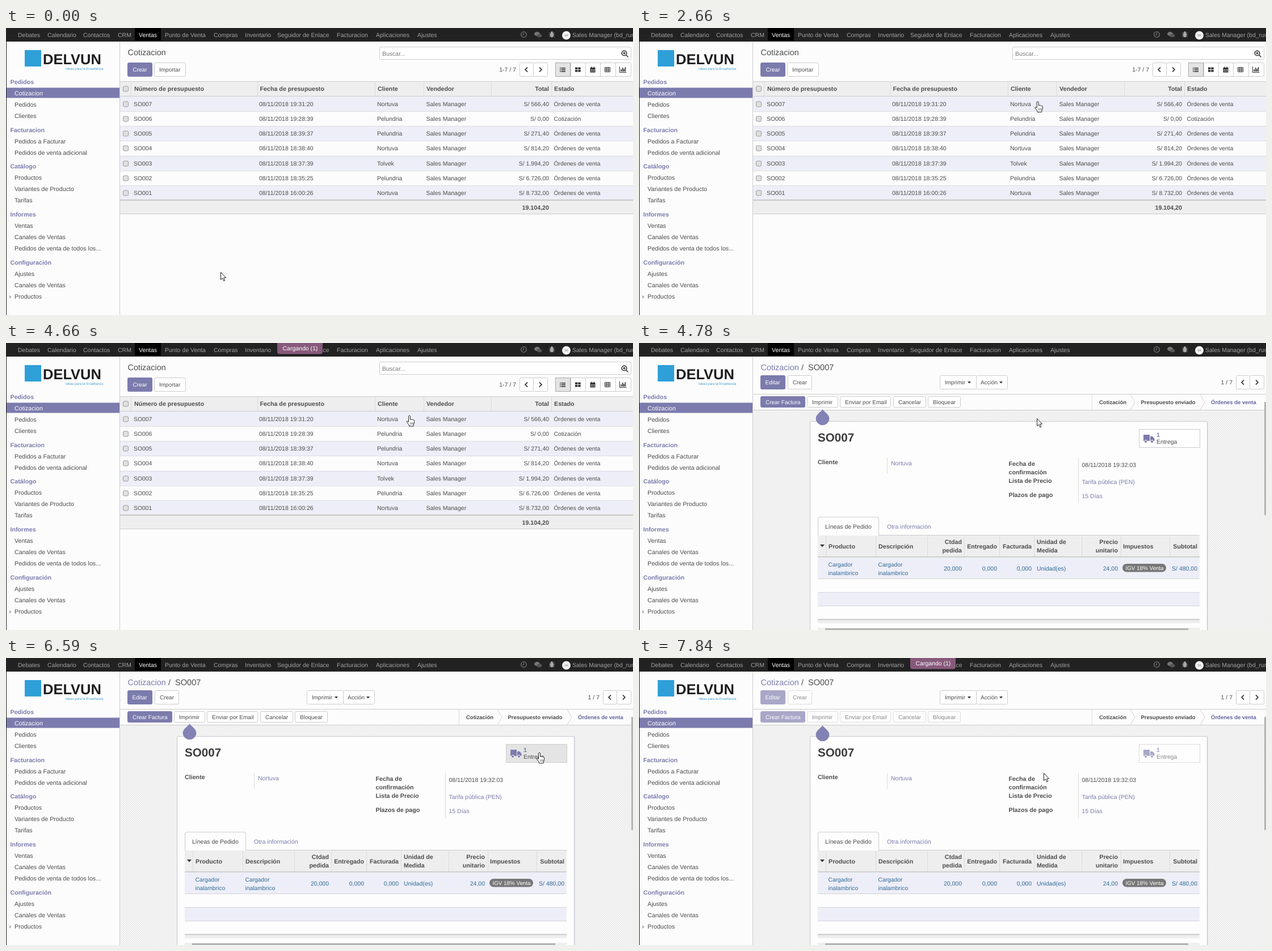
These frames come from a looping animation (1105 by 507 pixels, 7.99 s). An HTML page:

```html
<!DOCTYPE html>
<html lang="es">
<head>
<meta charset="utf-8">
<title>Cotizacion</title>
<style>
html, body { margin: 0; width: 100%; height: 100%; overflow: hidden; background: #fcfcfc; }
svg { display: block; width: 1105px; height: 507px; }
text { font-family: "Liberation Sans", Arial, sans-serif; text-rendering: geometricPrecision; white-space: pre; }
</style>
</head>
<body>
<svg id="stage" viewBox="0 0 1105 507"></svg>
<script>
const INK = '#4c4c4c', PURPLE = '#7c7bad', LINE = '#cccccc', STRIPE = '#eeeef8', LINK = '#2f6b94';
const LOOP = 7990;

// Drawing helpers, each returns SVG markup
const text = (x, y, s, { size = 10.5, fill = INK, bold, end } = {}) =>
  `<text x="${x}" y="${y}" font-size="${size}" fill="${fill}"` +
  `${bold ? ' font-weight="700"' : ''}${end ? ' text-anchor="end"' : ''}>${s}</text>`;
const bold = (x, y, s, o = {}) => text(x, y, s, { size: 10.7, bold: true, ...o });
const rect = (x, y, w, h, fill, extra = '') =>
  `<rect x="${x}" y="${y}" width="${w}" height="${h}" fill="${fill}" ${extra}/>`;
const box = (x, y, w, h, fill = '#fff', stroke = LINE, r = 2) =>
  rect(x + .5, y + .5, w - 1, h - 1, fill, `stroke="${stroke}" rx="${r}"`);
const path = (d, fill = 'none', stroke = 'none', w = 1) =>
  `<path d="${d}" fill="${fill}" stroke="${stroke}" stroke-width="${w}"/>`;
const hline = (x, y, w, c = LINE) => rect(x, y, w, 1, c);
const vline = (x, y, h, c = '#dcdcdc') => rect(x, y, 1, h, c);
const group = (id, body) => `<g id="${id}">${body}</g>`;
const button = (x, y, w, h, label, tx, primary) =>
  box(x, y, w, h, primary ? PURPLE : '#fff', primary ? PURPLE : LINE) +
  text(tx, y + h / 2 + 3.6, label, { size: 10, fill: primary ? '#fff' : INK });
const pager = (x, y) => {
  const arrow = (cx, d) => path(`M${cx - 2 * d} ${y + 8.5}l${4 * d} 4l${-4 * d} 4`, 'none', '#444', 1.8);
  return box(x, y, 25, 25) + box(x + 24, y, 26, 25) + arrow(x + 12, -1) + arrow(x + 37, 1);
};

function topBar() {
  const menu = [[21, 'Debates'], [73, 'Calendario'], [136, 'Contactos'], [197, 'CRM'], [234, 'Ventas'],
    [280, 'Punto de Venta'], [366, 'Compras'], [421, 'Inventario'], [478, 'Seguidor de Enlace'],
    [583, 'Facturacion'], [652, 'Aplicaciones'], [725, 'Ajustes']];
  const grey = '#777';
  return rect(0, 0, 1105, 24, '#222') + rect(227, 0, 46, 22, '#000') +
    menu.map(([x, s]) => text(x, 15.5, s, { fill: s === 'Ventas' ? '#fff' : '#a3a3a3' })).join('') +
    `<circle cx="912.5" cy="11.5" r="4.8" fill="none" stroke="${grey}" stroke-width="1.3"/>` +
    path('M912.5 8.5v3.5h-2.5', 'none', grey) +
    `<ellipse cx="936" cy="10.5" rx="5" ry="3.7" fill="${grey}"/>` +
    `<ellipse cx="940" cy="13.5" rx="4.5" ry="3" fill="#555"/>` +
    path('M957.5 8l9 8M966.5 8l-9 8M957 12h10', 'none', '#aaa') +
    '<ellipse cx="962" cy="12.3" rx="2.9" ry="4.2" fill="#aaa"/><circle cx="962" cy="8" r="2" fill="#aaa"/>' +
    '<circle cx="987.5" cy="13" r="7.5" fill="#f4f4f4"/>' + rect(984, 11, 7, 4, '#ccc', 'rx="1"') +
    text(998, 15.5, 'Sales Manager (bd_ruma', { fill: '#a3a3a3' });
}

function sideBar() {
  const menu = [
    [99, 'Pedidos', 'Cotizacion', 'Pedidos', 'Clientes'],
    [184, 'Facturacion', 'Pedidos a Facturar', 'Pedidos de venta adicional'],
    [248, 'Catálogo', 'Productos', 'Variantes de Producto', 'Tarifas'],
    [333, 'Informes', 'Ventas', 'Canales de Ventas', 'Pedidos de venta de todos los...'],
    [418, 'Configuración', 'Ajustes', 'Canales de Ventas', 'Productos']];
  return vline(200, 24, 483, LINE) + vline(0, 0, 507, '#222') +
    rect(33, 39, 29, 29, '#2f9fd8') +
    bold(65, 63.5, 'DELVUN', { size: 25.5, fill: '#1d1d1f' }) +
    text(105, 73.5, 'Ideas para la Enseñanza', { size: 6, fill: '#3d9fd6' }) +
    rect(1, 105.5, 199, 18, PURPLE) +
    menu.map(([y, head, ...items]) => bold(7.5, y, head, { fill: PURPLE }) +
      items.map((s, i) => text(15, y + 19.6 + i * 20.3, s,
        { size: 10.7, fill: s === 'Cotizacion' ? '#fff' : INK })).join('')
    ).join('') + path('M6 472l3.5 3l-3.5 3z', '#aaa');
}

function viewIcons() {
  const c = '#333';
  let s = box(968, 61, 134, 25) + rect(968.5, 61.5, 26, 24, '#e4e4e4', 'stroke="#aaa"');
  for (const x of [995, 1021, 1047, 1074]) s += vline(x, 61, 25, LINE);
  for (const y of [70, 73, 76]) s += rect(976, y, 1.6, 1.6, c) + rect(978.6, y, 7.4, 1.6, c);
  for (const x of [1003, 1008.3]) for (const y of [69.5, 74]) s += rect(x, y, 4.4, 3.6, c);
  s += rect(1029.5, 70, 9, 8.5, c) + rect(1031, 68.5, 1.5, 2, c) + rect(1035.5, 68.5, 1.5, 2, c);
  for (const x of [1031, 1033.5, 1036]) for (const y of [73, 75.5]) s += rect(x, y, 1.3, 1.3, '#fff');
  s += path('M1055.5 69.5h9v8h-9zM1055.5 72.2h9M1055.5 74.8h9M1058.5 69.5v8M1061.5 69.5v8', 'none', c);
  s += path('M1081.5 68v10.5h12', 'none', c);
  [4, 7, 5, 8].forEach((h, i) => s += rect(1083.5 + i * 2.4, 77 - h, 1.6, h, c));
  return s;
}

function listView() {
  const rows = [
    ['19:31:20', 'Nortuva', '566,40'], ['19:28:39', 'Pelundria', '0,00'], ['18:39:37', 'Pelundria', '271,40'],
    ['18:38:40', 'Nortuva', '814,20'], ['18:37:39', 'Tolvek', '1.994,20'], ['18:35:25', 'Pelundria', '6.726,00'],
    ['16:00:26', 'Nortuva', '8.732,00']];
  const check = y => box(206, y - 4.5, 10, 10, '#e0e0e0', '#9a9a9a', 2);
  let s = rect(201, 24, 904, 483, '#fcfcfc') + text(214.5, 48, 'Cotizacion', { size: 14.4 }) +
    box(658, 33, 444, 23) + text(663, 48.5, 'Buscar...', { fill: '#777' }) +
    '<circle cx="1089.5" cy="44.5" r="4.3" fill="none" stroke="#333" stroke-width="1.6"/>' +
    path('M1092.5 47.5l4 4M1087.3 44.5h4.4M1089.5 42.3v4.4', 'none', '#333', 1.5) +
    button(214, 61, 44, 25, 'Crear', 223.5, true) + button(261, 61, 56, 25, 'Importar', 270) +
    text(899, 77, '1-7 / 7', { end: true }) + pager(905, 61) + viewIcons() +
    rect(201, 94, 904, 27, '#eeeeee') + hline(201, 94, 904) + check(107);
  for (const x of [220, 443, 650, 736, 855, 961]) s += vline(x, 95, 26);
  s += [[226, 'Número de presupuesto'], [447.5, 'Fecha de presupuesto'], [655, 'Cliente'], [741, 'Vendedor'],
    [966, 'Estado']].map(([x, h]) => bold(x, 111, h)).join('') + bold(957, 111, 'Total', { end: true });
  rows.forEach(([time, client, total], i) => {
    const top = 121 + i * 26.15, y = Math.round(top + 17);
    if (i % 2 === 0) s += rect(201, top, 904, 26.15, STRIPE);
    s += hline(201, Math.round(top) - (i ? 0 : 1), 904, i ? '#dcdce2' : '#cacaca') + check(y - 4) +
      text(225, y, 'SO00' + (7 - i), { size: 10.4 }) + text(446, y, '08/11/2018 ' + time) +
      text(654, y, client) + text(740.5, y, 'Sales Manager') +
      text(957, y, 'S/ ' + total, { size: 10.4, end: true }) +
      text(965.5, y, i === 1 ? 'Cotización' : 'Órdenes de venta', { size: 10.3 });
  });
  return s + rect(201, 304, 904, 25, '#eeeeee') + rect(201, 303, 904, 2, '#c6c6c6') + hline(201, 328, 904) +
    bold(957, 321, '19.104,20', { end: true });
}

function orderLines() {
  const heads = [[334, 'Producto'], [422, 'Descripción'], [569, 'Ctdad', 'pedida'], [631, 'Entregado'],
    [692, 'Facturada'], [701, 'Unidad de', 'Medida'], [844, 'Precio', 'unitario'], [853, 'Impuestos'], [984, 'Subtotal']];
  const rightSide = new Set([569, 631, 692, 844, 984]);
  const cell = (draw, x, y, s, o = {}) => draw(x, y, s, { ...o, end: rightSide.has(x) });
  let s = rect(315, 340, 673, 38, '#eeeeee') + rect(315, 378, 673, 38, STRIPE) + rect(315, 440, 673, 24, STRIPE);
  for (const x of [329, 417, 508, 573, 635, 696, 780, 849, 935]) s += vline(x, 341, 36);
  s += path('M319 356h8l-4 4.5z', '#333') + rect(315, 377, 673, 1.5, '#c6c6c6');
  for (const y of [416, 440, 464]) s += hline(315, y, 673, '#d4d4da');
  for (const [x, a, b] of heads)
    s += b ? cell(bold, x, 355, a) + cell(bold, x, 370, b) : cell(bold, x, 362.5, a);
  for (const x of [333.5, 421.5])
    s += text(x, 394.5, 'Cargador', { fill: LINK, size: 10.3 }) + text(x, 409.5, 'inalambrico', { fill: LINK, size: 10.3 });
  for (const [x, v] of [[569, '20,000'], [631, '0,000'], [692, '0,000'], [701, 'Unidad(es)'], [844, '24,00'], [984, 'S/ 480,00']])
    s += cell(text, x, 401.5, v, { fill: LINK });
  return s + rect(852, 390, 77, 14.5, '#777', 'rx="7.2"') + text(857.5, 401, 'IGV 18% Venta', { fill: '#fff', size: 9.8 }) +
    rect(315, 487.5, 673, 2, '#c6c6c6') + rect(315, 490, 673, 5, '#eeeeee') +
    rect(315, 503, 673, 4, '#efefef') + rect(328, 504, 640, 3, '#b4b4b4');
}

function formView() {
  const caret = x => path(`M${x} 68h6l-3 3.4z`, '#333');
  const chevron = x => path(`M${x} 91l8 13.5l-8 13.5`, 'none', '#d4d4d4');
  const value = (x, y, s, fill = PURPLE) => text(x, y, s, { fill });
  const truck = path('M889 162h11v11h-11zM901 165h4l3.5 4v4h-7.5z', PURPLE) +
    [893, 904].map(x => `<circle cx="${x}" cy="174" r="2.5" fill="${PURPLE}" stroke="#fff"/>`).join('');
  return rect(201, 24, 904, 483, '#fcfcfc') +
    text(214.5, 48, 'Cotizacion', { size: 14.4, fill: PURPLE }) + text(286, 48, '/', { size: 14.4 }) +
    text(298, 48, 'SO007', { size: 14.6 }) +
    button(530, 57, 65, 25, 'Imprimir', 539) + button(594, 57, 56, 25, 'Acción', 602) + caret(579) + caret(635) +
    text(1046, 73, '1 / 7', { end: true }) + pager(1052, 57) + hline(201, 90, 904) +
    rect(201, 118, 904, 389, 'url(#weave)') + hline(201, 118, 904) +
    vline(798, 91, 27) + chevron(866) + chevron(989) +
    bold(811, 108, 'Cotización', { size: 9.5 }) + bold(884.5, 108, 'Presupuesto enviado', { size: 9.5 }) +
    bold(1008, 108, 'Órdenes de venta', { size: 9.5, fill: '#6463a0' }) +
    rect(1102, 104, 3, 200, '#b4b4b4') +
    rect(301, 138, 702, 380, '#dedee4', 'rx="2"') + box(301, 138, 701, 380, '#fdfdfd', '#c8c8d3') +
    bold(315, 174, 'SO007', { size: 20.6, fill: '#3c3c3c' }) +
    group('actions',
      button(214, 57, 44, 25, 'Editar', 222.5, true) + button(262, 57, 43, 25, 'Crear', 271) +
      button(214, 94, 79, 20, 'Crear Factura', 223, true) + button(296, 94, 55, 20, 'Imprimir', 305) +
      button(354, 94, 90, 20, 'Enviar por Email', 363) + button(448, 94, 58, 20, 'Cancelar', 457) +
      button(509, 94, 58, 20, 'Bloquear', 518) +
      group('delivery', box(881, 152, 108, 33, 'inherit', LINE, 0)) + truck +
      bold(912, 166, '1', { fill: PURPLE }) + text(912, 178, 'Entrega', { size: 10.4 })) +
    bold(315, 214, 'Cliente') + vline(437, 203, 28) + value(444, 216, 'Nortuva') +
    bold(651.5, 217, 'Fecha de') + bold(651.5, 232, 'confirmación') + bold(651.5, 247, 'Lista de Precio') +
    bold(651.5, 272, 'Plazos de pago') + vline(774, 203, 80) +
    value(780.5, 219, '08/11/2018 19:32:03', INK) + value(780.5, 248.5, 'Tarifa pública (PEN)') + value(780.5, 274, '15 Días') +
    hline(315, 339, 673) + path('M315.5 340v-30q0-2.5 2.5-2.5h102q2.5 0 2.5 2.5v30', '#fdfdfd', LINE) +
    text(328, 327.5, 'Líneas de Pedido') + value(437, 327.5, 'Otra información') + orderLines() +
    group('drop', path('M323.5 116.5C326 121 335 125 335 132.3a11.5 11.5 0 0 1-23 0C312 125 321 121 323.5 116.5z', '#8382b4', '#7170a6', .6));
}

const arrow = path('M.5.5v13.2l3-2.8l2.3 5l2-.9l-2.2-4.9h4z', '#fff', '#222');
const hand = path('M-1.5 1.2q1.5-2 3 0v6q2-1.2 2.6.4q2-1 2.5.5q2-.6 2 1.4v4l-1.6 3.2v2.2h-7.5v-1.8l-4.5-6q.4-2.2 3.5.4z', '#fff', '#222') +
  path('M2 12v4M4.2 12v4M6.4 12v4', 'none', '#444', .8);

document.getElementById('stage').innerHTML =
  `<defs><pattern id="weave" width="4" height="4" patternUnits="userSpaceOnUse">
    ${rect(0, 0, 4, 4, '#f5f5f5') + rect(0, 0, 2, 2, '#ececec') + rect(2, 2, 2, 2, '#ececec')}</pattern></defs>` +
  rect(0, 0, 1105, 507, '#fcfcfc') + topBar() + sideBar() + group('list', listView()) + group('form', formView()) +
  group('loading', path('M478 0h80v15q0 4.5-4.5 4.5h-71q-4.5 0-4.5-4.5z', '#875a7b') +
    text(487.5, 13, 'Cargando (1)', { fill: '#fff' })) +
  group('arrow', arrow) + group('hand', hand);

const el = id => document.getElementById(id);
const show = (id, on) => el(id).setAttribute('visibility', on ? 'visible' : 'hidden');
const latest = (list, t) => list.filter(item => item[0] <= t).pop();

const OPEN_ROW = 3190, OPEN_FORM = 4780, OPEN_DELIVERY = 6720;
const smooth = u => u * u * (3 - 2 * u);
const slowDown = u => 1 - (1 - u) ** 2;

// Pointer moves: first step, last step, number of steps, from x, y, to x, y, easing
const moves = [
  [0, 1, 2, 378, 431, 378, 431, smooth],
  [500, 1190, 6, 373, 424, 270, 289, smooth],
  [1820, 2790, 8, 302, 207, 711, 128, slowDown],
  [4660, 5610, 8, 711, 128, 532, 219, smooth],
  [5740, 6590, 7, 545, 218, 940, 167, smooth],
  [6870, 7840, 8, 934, 168, 713, 203, smooth]];

function pointer(t) {
  const [t0, t1, n, x0, y0, x1, y1, ease] = latest(moves, t);
  const step = Math.floor((t - t0 + 16) * (n - 1) / (t1 - t0));
  const e = ease(Math.min(1, step / (n - 1)));
  return [x0 + (x1 - x0) * e, y0 + (y1 - y0) * e];
}

// Opacity of the loading badge by time since the click
const fade = [[0, .3], [400, .74], [525, .84], [650, .95], [1080, 1]];
function loading(t) {
  if (t < OPEN_ROW || t >= OPEN_FORM && t < OPEN_DELIVERY) return 0;
  return latest(fade, t - (t < OPEN_FORM ? OPEN_ROW : OPEN_DELIVERY))[1];
}

function render(t) {
  const onForm = t >= OPEN_FORM, busy = t >= OPEN_DELIVERY;
  const [x, y] = pointer(t);
  const onDelivery = onForm && x > 881 && y < 185;
  const pointing = onForm ? onDelivery : y > 121 && y < 304;
  show('list', !onForm);
  show('form', onForm);
  el('actions').setAttribute('opacity', busy ? .65 : 1);
  el('delivery').setAttribute('fill', onDelivery && !busy ? '#e4e4e4' : '#fff');
  el('delivery').firstChild.removeAttribute('fill');
  el('loading').setAttribute('opacity', loading(t));
  const beat = Math.floor((t - 5610 + 1) / 139.4) * 139.4;
  el('drop').setAttribute('transform', `translate(0 ${2.6 * (1 - Math.cos(beat / 980 * 2 * Math.PI))})`);
  for (const id of ['arrow', 'hand']) el(id).setAttribute('transform', `translate(${x} ${y})`);
  show('arrow', !pointing);
  show('hand', pointing);
}

const start = performance.now();
function tick() {
  render((performance.now() - start) % LOOP);
  requestAnimationFrame(tick);
}
tick();
</script>
</body>
</html>
```
